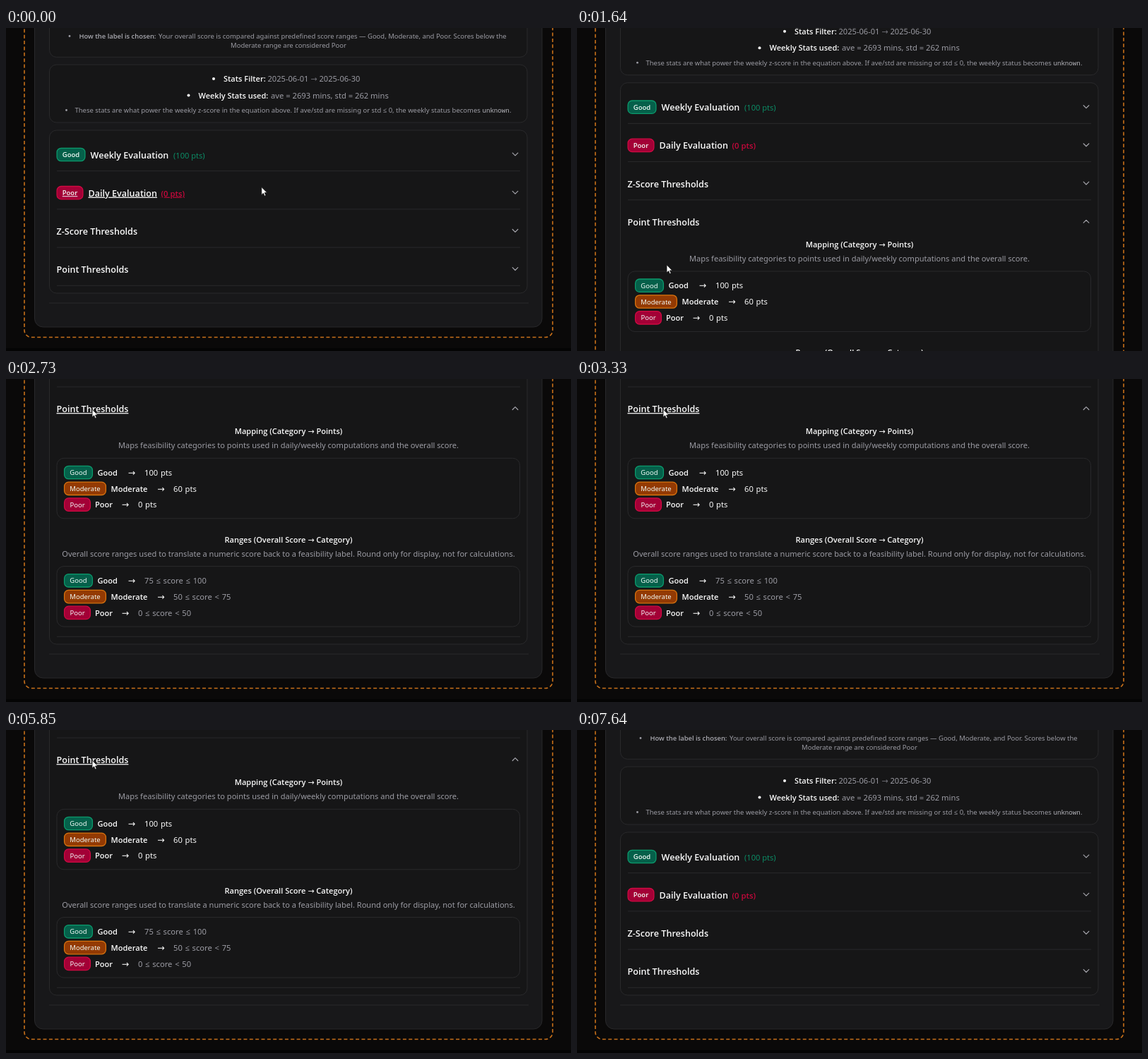
Animation, 800 px wide and 458 px high, one loop 7.7 s. Source, as an HTML page:

```html
<!DOCTYPE html>
<html lang="en">
<head>
<meta charset="utf-8">
<title>Evaluation panel</title>
<style>
  html, body { margin: 0; width: 100%; height: 100%; overflow: hidden; background: #0a0909; }
  svg { display: block; width: 800px; height: 458px; }
  text { font-family: "Noto Sans", "Open Sans", sans-serif; white-space: pre; }
  .b { font-family: "Open Sans", "Noto Sans", sans-serif; font-weight: 600; }
  .m { font-family: "Open Sans", "Noto Sans", sans-serif; font-weight: 500; }
  .code { font-family: "Noto Sans Mono", monospace; font-weight: 500; }
  .arrow { font-family: "DejaVu Sans", sans-serif; font-weight: 400; }
  .value { word-spacing: .8px; }
  .hover text { text-decoration: underline; }
</style>
</head>
<body>
<svg id="stage" viewBox="0 0 800 458" xmlns="http://www.w3.org/2000/svg"></svg>
<script>
const LOOP = 7700, OPEN_H = 300, ROW_H = 54.2;
const WHITE = '#fafafa', GREY = '#9c9ca4', LINE = '#29292b', BOX = '#161617';
const TONES = {
  Good: ['#05604a', '#0b9a6c', 41],
  Moderate: ['#933a03', '#d8730f', 60],
  Poor: ['#a30036', '#cf0a42', 38]
};

const text = (x, y, str, size, fill = WHITE, cls = '', anchor = 'start') =>
  `<text x="${x}" y="${y}" font-size="${size}" fill="${fill}" class="${cls}" text-anchor="${anchor}">${str}</text>`;
const rule = (x1, x2, y) => `<path d="M${x1} ${y}H${x2}" stroke="${LINE}"/>`;
const panel = (x, y, w, h, fill = BOX, id = '') =>
  `<rect id="${id}" x="${x}" y="${y}" width="${w}" height="${h}" rx="10" fill="${fill}" stroke="${LINE}"/>`;
const dot = (x, y, r, fill) => `<circle cx="${x}" cy="${y}" r="${r}" fill="${fill}"/>`;
const ARROW = '<tspan class="arrow">→</tspan>';

function badge(x, cy, name, cls = '') {
  const [fill, edge, w] = TONES[name];
  return `<rect x="${x + .6}" y="${cy - 9.2}" width="${w - 1.2}" height="18.4" rx="6" fill="${fill}" stroke="${edge}" stroke-width="1.3"/>` +
    text(x + w / 2, cy + 3.6, name, 9.5, '#f3fbf8', cls, 'middle');
}

function row(i, title, tone, points) {
  const cy = 179.5 + i * ROW_H, x = tone ? 78.5 + TONES[tone][2] : 71.5;
  const pts = !tone ? '' : tone === 'Good'
    ? text(237, cy + 5, points, 11.1, '#0b936a', 'm')
    : text(219.5, cy + 5, points, 11.3, '#c8083c', 'b');
  return `<g class="row">${tone ? badge(71.5, cy, tone, 'b') : ''}${text(x, cy + 5, title, 12.58, WHITE, 'b')}${pts}</g>` +
    `<path class="chev" d="M-3.8 -1.9L0 1.9L3.8 -1.9" transform="translate(721 ${cy - .5})" fill="none" stroke="#a4a4ab" stroke-width="1.2" stroke-linecap="round" stroke-linejoin="round"/>` +
    (i < 3 ? rule(72, 728, 202.7 + i * ROW_H) : '');
}

function section(y, title, note, values, fill) {
  const labelX = [129.5, 148.5, 126], arrowX = [178, 219.5, 169], valueX = [196, 237, 187];
  const items = Object.keys(TONES).map((name, i) => {
    const cy = y + 58.5 + i * 22.8;
    return badge(82, cy, name) + text(labelX[i], cy + 4.2, name, 11.05, WHITE, 'b') +
      text(arrowX[i], cy + 4.2, ARROW, 12.5, WHITE, '', 'middle') +
      text(valueX[i], cy + 4.2, values[i], 11.2, fill, 'value');
  });
  return text(400, y + 4.2, title, 11.05, WHITE, 'b', 'middle') + text(400, y + 24.2, note, 11.05, GREY, '', 'middle') +
    panel(72, y + 38.3, 655.5, 85.5) + items.join('');
}

const intro =
  panel(61.5, -60, 676.5, 101.3) + dot(90, 11.5, 1.4, GREY) +
  text(103.5, 15, 'How the label is chosen:', 9.4, '#aaaab1', 'b') +
  text(216, 15, 'Your overall score is compared against predefined score ranges — Good, Moderate, and Poor. Scores below the', 9.47, GREY) +
  text(400, 28.2, 'Moderate range are considered Poor', 9.47, GREY, '', 'middle') +
  panel(61.5, 52, 676.5, 82) +
  dot(294, 72, 2, WHITE) + text(308, 76, 'Stats Filter:', 11, WHITE, 'b') +
  text(370.5, 76, `2025-06-01 <tspan fill="#6f6f76">${ARROW}</tspan> 2025-06-30`, 11.1, GREY) +
  dot(258.5, 95.5, 2, WHITE) + text(272.5, 99.5, 'Weekly Stats used:', 11, WHITE, 'b') +
  text(375, 99.5, 'ave = 2693 mins, std = 262 mins', 11.2, GREY) +
  dot(85.5, 116.5, 1.4, GREY) +
  text(97.5, 120, 'These stats are what power the weekly z-score in the equation above. If ave/std are missing or std ≤ 0, the weekly status becomes', 9.48, GREY) +
  text(674.5, 120, 'unknown', 9.1, '#b4b4ba', 'code') + text(713, 120, '.', 9.47, GREY);

const $ = id => document.getElementById(id);
$('stage').innerHTML = `
  <defs><clipPath id="clip"><rect id="clipBox" x="40" width="720"/></clipPath></defs>
  <g id="frame">
    <rect y="454" width="800" height="400" fill="#040404"/>
    <path d="M26 -700V428.5a10 10 0 0 0 10 10H764a10 10 0 0 0 10 -10V-700" fill="none" stroke="#c8701a" stroke-width="1.6" stroke-dasharray="5 3.35"/>
    <rect x="40.5" y="-700" width="718.5" height="1124" rx="12" fill="#18181a" stroke="${LINE}"/>
    ${rule(61, 740, 390)}
  </g>
  ${panel(61.5, 145, 676.5, 231, BOX, 'list')}
  <g id="foot">${rule(72, 728, 365.3)}</g>
  <g id="upper">${intro}
    ${row(0, 'Weekly Evaluation', 'Good', '(100 pts)')}
    ${row(1, 'Daily Evaluation', 'Poor', '(0 pts)')}
    ${row(2, 'Z-Score Thresholds')}
    ${row(3, 'Point Thresholds')}
  </g>
  <g clip-path="url(#clip)"><g id="details">
    ${section(374, `Mapping (Category ${ARROW} Points)`,
      'Maps feasibility categories to points used in daily/weekly computations and the overall score.',
      ['100 pts', '60 pts', '0 pts'], WHITE)}
    ${section(527.3, `Ranges (Overall Score ${ARROW} Category)`,
      'Overall score ranges used to translate a numeric score back to a feasibility label. Round only for display, not for calculations.',
      ['75 ≤ score ≤ 100', '50 ≤ score &lt; 75', '0 ≤ score &lt; 50'], GREY)}
  </g></g>
  <g id="cursor">
    <path id="pointer" d="M0 0V11.2L2.6 8.8L4.3 12.8L6.2 12L4.5 8.1H8Z" fill="#fff" stroke="#111" stroke-width=".8"/>
    <path id="beam" d="M-2 -5H2M0 -5V5M-2 5H2" fill="none" stroke="#c8c8c8" stroke-width="1"/>
  </g>`;
const rows = [...document.querySelectorAll('.row')];
const chevron = document.querySelectorAll('.chev')[3];

// Cubic Bezier easing, solved by bisection
function bezier(x1, x2, y1, y2) {
  const at = (s, a, b) => 3 * (1 - s) * (1 - s) * s * a + 3 * (1 - s) * s * s * b + s * s * s;
  return p => {
    if (p <= 0 || p >= 1) return p <= 0 ? 0 : 1;
    let lo = 0, hi = 1;
    for (let i = 0; i < 24; i++) {
      const mid = (lo + hi) / 2;
      if (at(mid, x1, x2) < p) lo = mid; else hi = mid;
    }
    return at(lo, y1, y2);
  };
}
const easeOut = bezier(0, .58, 0, 1), easeTurn = bezier(.4, .2, 0, 1), easeMove = bezier(.42, .58, 0, 1);
const OPEN_AT = 1180, CLOSE_AT = 6454, TOGGLE = 200;
const toggled = (t, ease) => ease((t - OPEN_AT) / TOGGLE) - ease((t - CLOSE_AT) / TOGGLE);

// Pointer moves: start, end, x, y
const moves = [[30, 790, 127, 342], [1600, 1720, 127, 316.5], [2440, 2710, 122, 43], [6760, 7180, 150, -24]];
function pointerAt(t) {
  let x = 361.8, y = 225.5;
  for (const [a, b, tx, ty] of moves) {
    const k = easeMove((t - a) / (b - a));
    x += (tx - x) * k;
    y += (ty - y) * k;
  }
  return [x, y];
}

function render(t) {
  const h = OPEN_H * toggled(t, easeOut);
  const scroll = Math.min(h, OPEN_H * easeMove((t - 1600) / 125));
  const shift = (id, dy) => $(id).setAttribute('transform', `translate(0 ${dy})`);
  shift('frame', h - scroll);
  shift('foot', h - scroll);
  shift('upper', -scroll);
  shift('details', -scroll);
  $('list').setAttribute('y', 145 - scroll);
  $('list').setAttribute('height', 231 + h);
  $('clipBox').setAttribute('y', 365 - scroll);
  $('clipBox').setAttribute('height', h);
  chevron.setAttribute('transform', `translate(721 ${179 + 3 * ROW_H}) rotate(${180 * toggled(t, easeTurn)})`);

  const [x, y] = pointerAt(t);
  const over = Math.floor((y + scroll - 148.5) / ROW_H);
  rows.forEach((r, i) => r.setAttribute('class', i === over ? 'row hover' : 'row'));
  $('cursor').setAttribute('transform', `translate(${x} ${y})`);
  const beam = t >= 6500 && t < 6760;
  $('pointer').style.display = beam ? 'none' : '';
  $('beam').style.display = beam ? '' : 'none';
}

const start = performance.now();
function tick() {
  render((performance.now() - start) % LOOP);
  requestAnimationFrame(tick);
}
tick();
</script>
</body>
</html>
```
